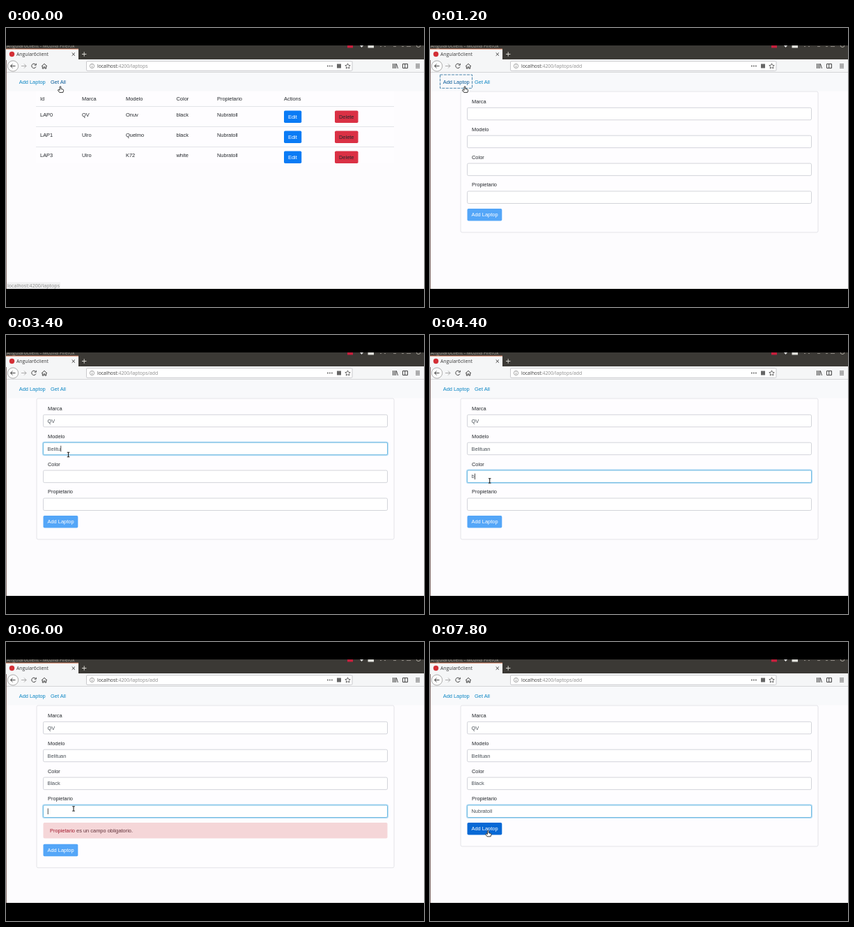
Write an HTML page that moves like this. It is 600x400 px and loops after 8 s.

```html
<!DOCTYPE html>
<html lang="en">
<head>
<meta charset="utf-8">
<title>Laptop form</title>
<style>
  html, body { margin: 0; width: 100%; height: 100%; overflow: hidden; background: #000; }
  svg { display: block; width: 100%; height: 100%; font: 7.45px "Liberation Sans", Arial, sans-serif; }
  text { fill: #24282c; white-space: pre; }
  .ui { font: 6.85px "Open Sans", "Noto Sans", sans-serif; fill: #383838; }
  .line { fill: none; stroke: #454545; stroke-width: 1; }
  .link { fill: #0b86c4; }
  .link.hover { fill: #075a98; }
  .light { fill: #fff; }
</style>
</head>
<body>
<svg viewBox="0 0 600 400">
  <defs>
    <clipPath id="panel"><rect y="25" width="600" height="5"/></clipPath>
    <path id="hand" d="M-.9 .2Q0-.8 .9 .2V3.2L4 4.1Q4.8 4.5 4.6 5.6L3.8 8.4H-1.2L-3.6 5.2Q-3.2 3.9-2 4.5L-.9 5.3Z" fill="#fff" stroke="#222" stroke-width=".9"/>
    <path id="beam" d="M-1.8-3.3H1.8M0-3.3V3.3M-1.8 3.3H1.8" fill="none" stroke="#222" stroke-width="1.1"/>
    <path id="arrow" d="M0 0V8.2L2 6.4 3.3 9.2 4.6 8.6 3.3 5.9H6Z" fill="#222" stroke="#fff" stroke-width=".7"/>
  </defs>

  <rect width="600" height="400"/>
  <rect y="25" width="600" height="20" fill="#3b3935"/>
  <g clip-path="url(#panel)">
    <text class="ui" x="1" y="27.6" style="fill:#aaa69d">Angular6client - Mozilla Firefox</text>
    <rect x="490" y="24" width="8" height="4.5" fill="#c51f3c"/>
    <path d="M508 25h5l-2.5 3z" fill="#ddd"/>
    <rect x="519.5" y="24" width="8.5" height="4.5" fill="#deded9"/>
    <path d="M537 26.5h2m4 0h2m11 0h4m8 0h3m4 0h6" stroke="#8b8780"/>
    <circle cx="592" cy="24.5" r="3" fill="none" stroke="#aaa69d"/>
  </g>

  <rect y="30" width="104" height="16" fill="#f5f6f7"/>
  <rect y="29.6" width="104" height="1" fill="#dc815f"/>
  <circle cx="8.5" cy="37.5" r="3.7" fill="#d32f36"/>
  <text class="ui" x="15" y="40">Angular6client</text>
  <path class="line" d="M94.7 35.5l4.2 4.2m0-4.2l-4.2 4.2"/>
  <path class="line" d="M109 37.5h6.4m-3.2-3.2v6.4" style="stroke:#d8d6d0"/>

  <rect y="45" width="600" height="19" fill="#f5f6f7"/>
  <circle cx="10" cy="54.5" r="7.6" fill="#fff" stroke="#aaa"/>
  <path class="line" d="M13.5 54.5h-7m3-3l-3 3 3 3"/>
  <path class="line" d="M22 54.5h7m-3-3l3 3-3 3" style="stroke:#aaa"/>
  <path class="line" d="M42.6 52.5a3.2 3.2 0 1 0 .4 3M43.3 50.8v2.4h-2.6"/>
  <path class="line" d="M51 55l4-3.7 4 3.7M52.3 54.5v3.6h1.8v-2.3h1.8v2.3h1.8v-3.6"/>
  <rect x="115.5" y="47.5" width="381.5" height="13.8" rx="1.5" fill="#fff" stroke="#c9c9cc"/>
  <circle cx="123.5" cy="54.5" r="3.1" fill="none" stroke="#888" stroke-width=".8"/>
  <path d="M123.5 54v2.3m0-3.9v.8" stroke="#888" stroke-width=".8"/>
  <text class="ui" x="131" y="57">localhost<tspan id="path" fill="#8a8a8a"></tspan></text>
  <path d="M461 54.5h1.7m1.3 0h1.7m1.3 0h1.7" stroke="#555" stroke-width="1.7"/>
  <rect x="475" y="51.5" width="6" height="6" fill="#666"/>
  <path class="line" d="M490.5 50.9l1.1 2.4 2.6.3-1.9 1.8.5 2.6-2.3-1.3-2.3 1.3.5-2.6-1.9-1.8 2.6-.3z" style="stroke-width:.8"/>
  <path class="line" d="M555.5 51v7m2-7v7m2-7v7m1-6.5l2 6.5"/>
  <path class="line" d="M569.5 51.5h7v6h-7zm3.2 0v6M588 52h6m-6 2.5h6m-6 2.5h6"/>
  <rect y="63.3" width="600" height=".8" fill="#c8c8ca"/>

  <rect y="64" width="600" height="310" fill="#fdfcfe"/>
  <rect y="64" width="600" height="26.5" fill="#f8f9fb"/>
  <g id="page"></g>
  <rect y="46" width=".8" height="328" fill="#6e5450"/>
  <use id="pointer"/>
</svg>

<script>
const STEP = 200, LOOP = 8000, OPEN_FORM = 4;
const $ = id => document.getElementById(id);

// counts: letters typed at each step; -1 is a lower-case slip, 0 its deletion
const fields = [
  { label: 'Marca', word: 'QV', focus: 8, start: 9, counts: [1, 2] },
  { label: 'Modelo', word: 'Belituan', focus: 13, start: 14, counts: [1, 2, 4, 6, 7, 8] },
  { label: 'Color', word: 'Black', focus: 21, start: 22, counts: [-1, 0, 1, 3, 5] },
  { label: 'Propietario', word: 'Nubratoll', focus: 28, start: 29, counts: [-1, 0, 1, 2, 4, 5, 6, 8, 9] }
];
const laptops = [
  ['LAP0', 'QV', 'Onuv', 'black', 'Nubratoll'],
  ['LAP1', 'Ulro', 'Quelmo', 'black', 'Nubratoll'],
  ['LAP3', 'Ulro', 'K72', 'white', 'Nubratoll']
];
const columns = [49, 109, 172, 244.5, 303, 399];
// step, x, y
const route = [
  [0, 78, 84], [1, 78, 84], [3, 50, 84], [7, 50, 84], [8, 97, 123.3], [11, 97, 123.3],
  [13, 89.5, 168], [17, 89.5, 171.5], [19, 89.5, 171.5], [21, 85.7, 209], [26, 85.7, 209],
  [28, 97, 239], [37, 97, 239], [38, 84, 274], [39, 83.3, 270.5]
];

const text = (x, y, s, cls = '') => `<text x="${x}" y="${y}" class="${cls}">${s}</text>`;
const rect = (x, y, w, h, fill, more = '') =>
  `<rect x="${x}" y="${y}" width="${w}" height="${h}" fill="${fill}" ${more}/>`;
const button = (x, y, w, fill, label, cls) =>
  rect(x, y, w, 17.5, fill, 'rx="1.8"') + text(x + 6, y + 11.4, label, cls);

function pointerAt(step) {
  const i = Math.max(1, route.findIndex(p => p[0] >= step));
  const [s0, x0, y0] = route[i - 1], [s1, x1, y1] = route[i];
  const k = (step - s0) / (s1 - s0);
  return { x: x0 + (x1 - x0) * k, y: y0 + (y1 - y0) * k };
}

function valueAt({ word, start, counts }, step) {
  if (step < start) return '';
  const n = counts[Math.min(step - start, counts.length - 1)];
  return n < 0 ? word[0].toLowerCase() : word.slice(0, n);
}

function listPage() {
  const head = ['Id', 'Marca', 'Modelo', 'Color', 'Propietario', 'Actions'];
  let out = rect(43, 90.5, 514, 104, '#fefdff') + head.map((h, i) => text(columns[i], 104, h)).join('');
  laptops.forEach((row, r) => {
    const y = 118.5 + r * 29;
    out += rect(43, y - 6.3, 514, .8, '#dcdfe3') +
      row.map((cell, i) => text(columns[i], y + 8.3, cell)).join('') +
      button(399, y, 25.2, '#0a7bf5', 'Edit', 'light') +
      button(472, y, 33.5, '#da3145', 'Delete');
  });
  return out;
}

function formPage(step, pointer) {
  const active = fields.filter(f => step >= f.focus).pop();
  let y = 105, out = '', kind = 'arrow', complete = true;
  for (const field of fields) {
    const value = valueAt(field, step), focused = field === active;
    const top = y + 9.3;
    if (!value) complete = false;
    if (pointer.y >= top - 1 && pointer.y <= top + 18) kind = 'beam';
    out += text(60, y + 2.7, field.label);
    if (focused) out += rect(53, top - .5, 495, 18.5, 'none', 'rx="2.2" stroke="#b5dcf5" stroke-width="2"');
    out += rect(53.5, top, 494, 17.5, '#fff', `rx="1.8" stroke="${focused ? '#69b7df' : '#ced1d6'}" stroke-width=".9"`) +
      `<text x="59.5" y="${top + 11.3}" ${focused ? 'id="entry"' : ''} style="fill:#495057">${value}</text>`;
    if (focused) {
      const last = field.start + field.counts.length - 1;
      if (step <= last || (step - last) % 5 < 2) out += rect(59.8, top + 4.5, .8, 8.5, '#222', 'id="caret"');
    }
    y += 39.9;
    if (step > field.start && !value) {
      out += rect(53.5, top + 25, 494, 22.5, '#f5d6d8', 'rx="1.8"') +
        `<text x="63" y="${top + 38.8}" style="fill:#63333a"><tspan fill="#a3192c">${field.label}</tspan> es un campo obligatorio.</text>`;
      y += 30.7;
    }
  }
  const top = y - 5.6;
  const hover = pointer.y > top && pointer.y < top + 18 && pointer.x < 103;
  if (hover && complete) kind = 'hand';
  const fill = !complete ? '#54a6f8' : hover ? '#0869d5' : '#0a7bf5';
  const card = rect(44, 91, 513, top + 34 - 91, '#fefdff', 'rx="2" stroke="#e1e1e6" stroke-width=".9"');
  return { kind, html: card + out + button(53.5, top, 49.8, fill, 'Add Laptop', 'light') };
}

function render(step) {
  const pointer = pointerAt(step), onForm = step >= OPEN_FORM;
  const onNav = pointer.y > 67 && pointer.y < 87;
  const onAdd = onNav && pointer.x < 61, onAll = onNav && pointer.x > 62;
  const form = onForm && formPage(step, pointer);
  let html = form ? form.html : listPage();
  html += text(18.7, 79.8, 'Add Laptop', onAdd ? 'link hover' : 'link') +
    text(64, 79.8, 'Get All', onAll ? 'link hover' : 'link');
  if (onForm && step < fields[0].focus)
    html += rect(14.5, 67, 46, 19.3, 'none', 'stroke="#3c7ba5" stroke-width=".9" stroke-dasharray="4 1.5"');
  if (!onForm && onNav)
    html += rect(0, 364.5, onAdd ? 93 : 78, 9.5, '#f0f0f1') +
      `<text class="ui" x="2" y="371.6" style="font-size:7.1px;fill:#8d8d8d">localhost:4200/laptops${onAdd ? '/add' : ''}</text>`;
  $('page').innerHTML = html;
  $('path').textContent = ':4200/laptops' + (onForm ? '/add' : '');
  if ($('caret')) $('caret').setAttribute('x', 59.8 + $('entry').getComputedTextLength());
  $('pointer').setAttribute('href', '#' + (onNav ? 'hand' : form ? form.kind : 'arrow'));
  $('pointer').setAttribute('transform', `translate(${pointer.x} ${pointer.y})`);
}

let shown = -1;
function tick() {
  const step = Math.floor(performance.now() % LOOP / STEP);
  if (step !== shown) render(shown = step);
  requestAnimationFrame(tick);
}
tick();
</script>
</body>
</html>
```
